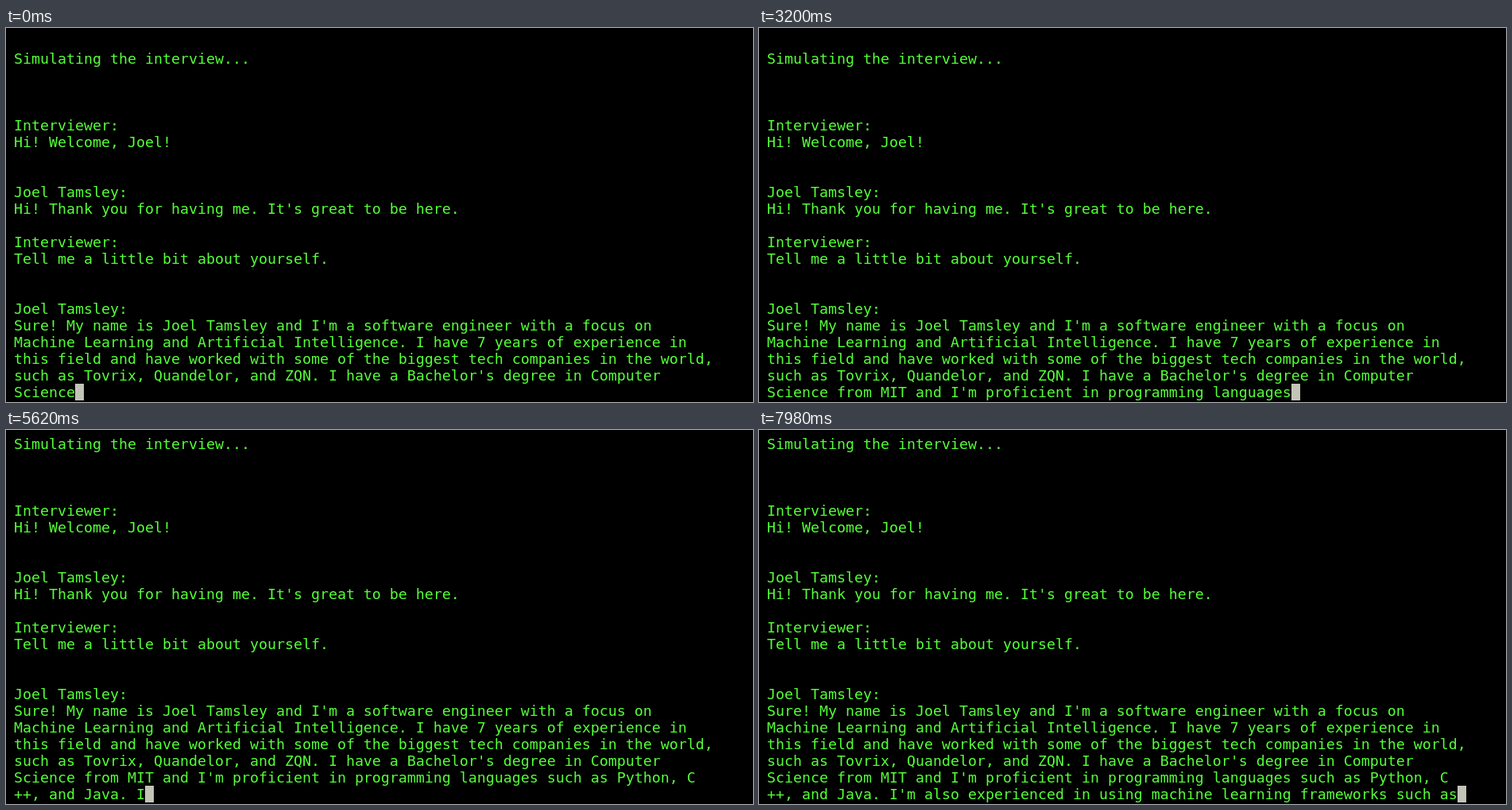
Write an HTML page that moves like this. It is 940 by 471 pixels and loops after 8000 ms.

```html
<!DOCTYPE html>
<html lang="en">
<head>
<meta charset="utf-8">
<title>Interview simulation</title>
<style>
  html, body { margin: 0; width: 100%; height: 100%; overflow: hidden; background: #000; }
  svg { display: block; width: 940px; height: 471px; background: #000; }
  text { font: 18.27px "DejaVu Sans Mono", monospace; fill: #55ff38; white-space: pre; }
</style>
</head>
<body>
<svg viewBox="0 0 940 471"><g id="screen"></g></svg>
<script>
const LOOP = 8000, LEFT = 10, COL = 11, ROW = 21, BASE = 45, VISIBLE = 21;

const intro = `Simulating the interview...



Interviewer:
Hi! Welcome, Joel!


Joel Tamsley:
Hi! Thank you for having me. It's great to be here.

Interviewer:
Tell me a little bit about yourself.


Joel Tamsley:
Sure! My name is Joel Tamsley and I'm a software engineer with a focus on
Machine Learning and Artificial Intelligence. I have 7 years of experience in
this field and have worked with some of the biggest tech companies in the world,
such as Tovrix, Quandelor, and ZQN. I have a Bachelor's degree in Computer
Science`;

// Streamed tokens with the time each one appears
const tokens = [
  [1700, " from"], [2000, " MIT"], [2420, " and"], [2640, " I"], [2720, "'m"],
  [2840, " proficient"], [2960, " in"], [3080, " programming"], [3200, " languages"],
  [3400, " such"], [3760, " as"], [4040, " Python"], [4180, ","], [4340, " C"],
  [4480, "\n++"], [4600, ","], [4760, " and"], [5020, " Java"], [5260, "."],
  [5500, " I"], [5740, "'m"], [5980, " also"], [6240, " experienced"], [6480, " in"],
  [6720, " using"], [6960, " machine"], [7200, " learning"], [7440, " frameworks"],
  [7680, " such"], [7900, " as"]
];

const screen = document.getElementById("screen");

function add(tag, attrs) {
  const el = document.createElementNS("http://www.w3.org/2000/svg", tag);
  for (const key in attrs) el.setAttribute(key, attrs[key]);
  return screen.appendChild(el);
}

const rows = Array.from({ length: VISIBLE + 1 }, (_, i) =>
  add("text", { x: LEFT, y: BASE + i * ROW }));
const cursor = add("rect", { width: COL, height: ROW, fill: "#c3c3b8" });

let shown = "";

function draw(t) {
  const typed = tokens.filter(([at]) => at <= t).map(([, word]) => word).join("");
  const content = intro + typed;
  if (content === shown) return;
  shown = content;

  const lines = content.split("\n");
  const last = lines.length - 1;
  rows.forEach((row, i) => { row.textContent = lines[i] || ""; });
  cursor.setAttribute("x", LEFT + lines[last].length * COL);
  cursor.setAttribute("y", BASE + last * ROW - 17);
  const scroll = Math.max(0, lines.length - VISIBLE) * ROW;
  screen.setAttribute("transform", `translate(0 ${-scroll})`);
}

const start = performance.now();
function tick() {
  draw((performance.now() - start) % LOOP);
  requestAnimationFrame(tick);
}
tick();
</script>
</body>
</html>
```
